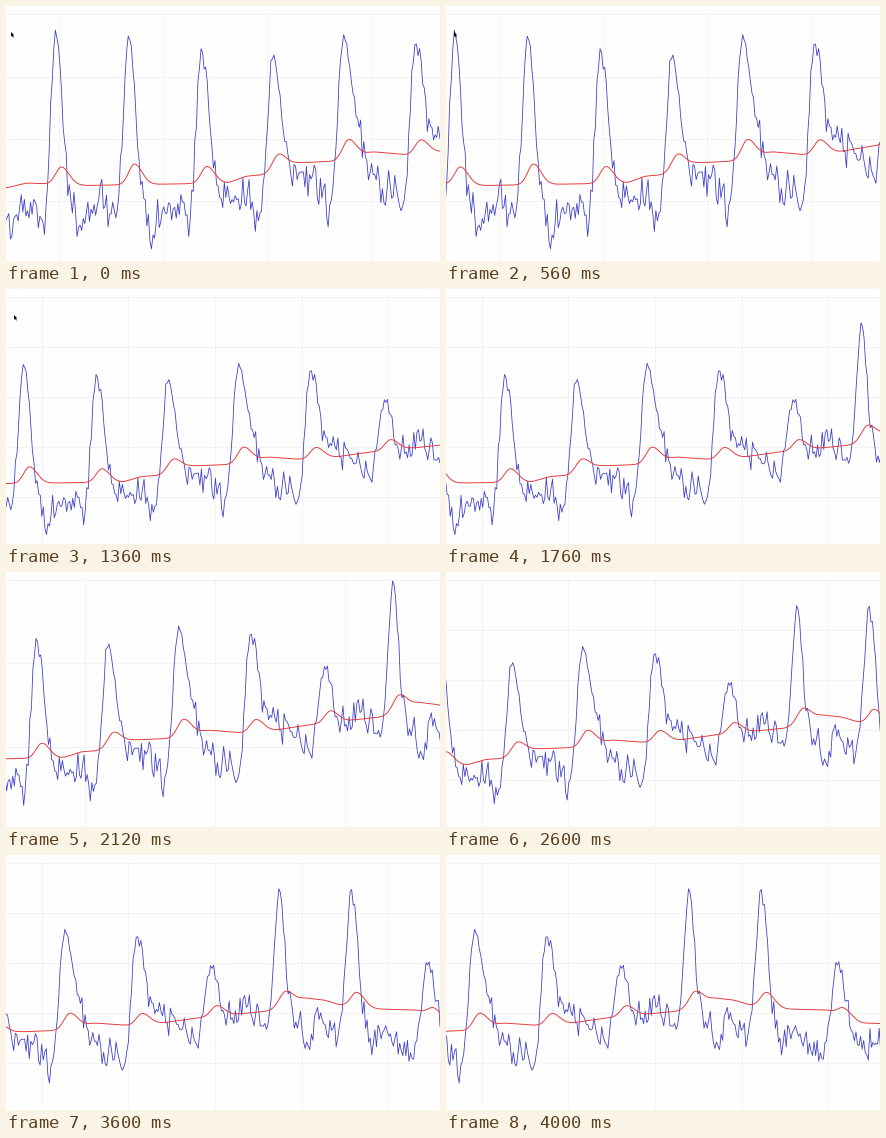
A matplotlib script that plays this animation: 434 px wide and 255 px high, repeating every 4040 ms.

```python
import matplotlib.pyplot as plt
import numpy as np
from matplotlib.animation import FuncAnimation
from matplotlib.patches import Polygon

W, H, DPI = 434, 255, 64
FRAMES, INTERVAL = 101, 40
TOP, BOTTOM = 7, 257            # pixel rows of the plot's upper and lower edge
LEFT, SPAN = -52, 520           # the plot runs past both sides of the stage
PX = 72 / DPI

# beat: position, height, rise width, fall width, bump in the average
BEATS = [
    (50, 3.68, 5.4, 6.5, .28), (123, 3.68, 5.2, 6.0, .33),
    (195.5, 3.38, 5.2, 7.6, .27), (267, 3.32, 5.4, 8.2, .24),
    (337, 3.62, 5.2, 11, .29), (409.5, 3.52, 5.2, 8.5, .22),
    (484, 2.95, 6.3, 6.8, .21), (552.5, 4.36, 5.5, 5.4, .27),
    (624, 4.42, 5.0, 6.6, .29), (701, 3.02, 6.0, 7.0, .17),
]
# level between the beats
REST = np.array([
    (0, .85), (4, .45), (18, 1.1), (33, .9), (38, .35), (66, .8),
    (74, .5), (96, 1.15), (109, .65), (138, .9), (147, .5), (156, .8),
    (178, .95), (183, .6), (214, 1.05), (245, 1.1), (252, .6),
    (287, 1.35), (318, 1.2), (324, .75), (358, 1.45), (390, 1.2),
    (397, .6), (428, 2.0), (456, 1.65), (471, 1.25), (515, 2.1),
    (535, 1.85), (541, 1.4), (567, 1.9), (581, 1.35), (591, 1.95),
    (612, 1.5), (645, 1.4), (658, 1.75), (685, 1.05), (712, 1.6),
    (727, 1.35),
])
# slow part of the average
TREND = np.array([
    (0, 1.2), (20, 1.28), (80, 1.24), (222, 1.28), (240, 1.39),
    (257, 1.41), (290, 1.6), (328, 1.63), (367, 1.78), (402, 1.73),
    (434, 1.78), (466, 1.87), (541, 2.02), (577, 2.28), (597, 2.24),
    (613, 2.14), (650, 2.06), (690, 2.04), (724, 1.78), (780, 1.75),
])


def hump(x, center, rise, fall):
    d = x - center
    return np.exp(-.5 * (d / np.where(d < 0, rise, fall)) ** 2)


def make_signal():
    x = np.arange(-8, 760, 1.55)
    rest = np.interp(x, *REST.T)
    y, beat = rest.copy(), np.zeros_like(x)
    for center, height, rise, fall, _ in BEATS:
        h = hump(x, center, rise, fall)
        y += (height - rest) * h
        beat = np.maximum(beat, h)
    rng = np.random.default_rng(7)
    noise = np.clip(rng.normal(0, .17, x.size), -.36, .36)
    return x, y + noise * (1 - .55 * beat)


def make_average():
    x = np.arange(-20, 780, 1.0)
    kernel = np.hanning(13)
    y = np.interp(x, *TREND.T)
    y = np.convolve(np.pad(y, 6, mode="edge"), kernel / kernel.sum(), "valid")
    for center, *_, bump in BEATS:
        y += bump * hump(x, center + 5.5, 5.8, 7.5)
    return x, y


def scroll(i):
    # the first moments stutter: ten steps in fourteen frames
    t = i if i >= 14 else i * 10 // 14 * 1.4
    return np.interp(t, [0, 14, 34, 53, 65, 80, 100],
                     [0, 41, 105, 165, 201, 248.5, 309])


def y_scale(i):
    """Top value of the axis and its number of divisions."""
    if i < 27:
        return 4, 4
    if 50 <= i < 63:
        return 4.5, 3
    return 5, 5


def grid_path(n):
    xs, ys = [], []
    for k in range(n):
        y = round(TOP + (BOTTOM - TOP) * k / n) + .5
        xs += [0, W, np.nan]
        ys += [y, y, np.nan]
    for k in range(1, n + 1):
        x = round(LEFT + SPAN * k / (n + 1)) + .5
        xs += [x, x, np.nan]
        ys += [TOP, H, np.nan]
    return xs, ys


signal, average = make_signal(), make_average()

fig = plt.figure(figsize=(W / DPI, H / DPI), dpi=DPI, facecolor="#fefefe")
ax = fig.add_axes([0, 0, 1, 1])
ax.set(xlim=(0, W), ylim=(H, 0))
ax.axis("off")

grid, = ax.plot([], [], color="#eeeeee", lw=PX, ls=(0, (2, 1)))
blue, = ax.plot([], [], color="#3c3cc8", lw=.8 * PX)
red, = ax.plot([], [], color="#e43a3a", lw=.95 * PX)
ARROW = np.array([(0, 0), (0, 4.6), (1.1, 3.7), (2, 5.6), (2.8, 5.2),
                  (2, 3.4), (3.3, 3.3)])
cursor = ax.add_patch(Polygon(ARROW, fc="black", ec="none", zorder=5))


def draw(i):
    top, n = y_scale(i)
    shift = scroll(i)
    grid.set_data(*grid_path(n))
    for line, (x, v) in ((blue, signal), (red, average)):
        line.set_data(x - shift, BOTTOM - v * (BOTTOM - TOP) / top)
    cursor.set_xy(ARROW + (np.interp(i, [2, 8], [5, 8]), 26))
    cursor.set_visible(i < 38)
    return grid, blue, red, cursor


anim = FuncAnimation(fig, draw, frames=FRAMES, interval=INTERVAL,
                     repeat=True, repeat_delay=0)
plt.show()
```
